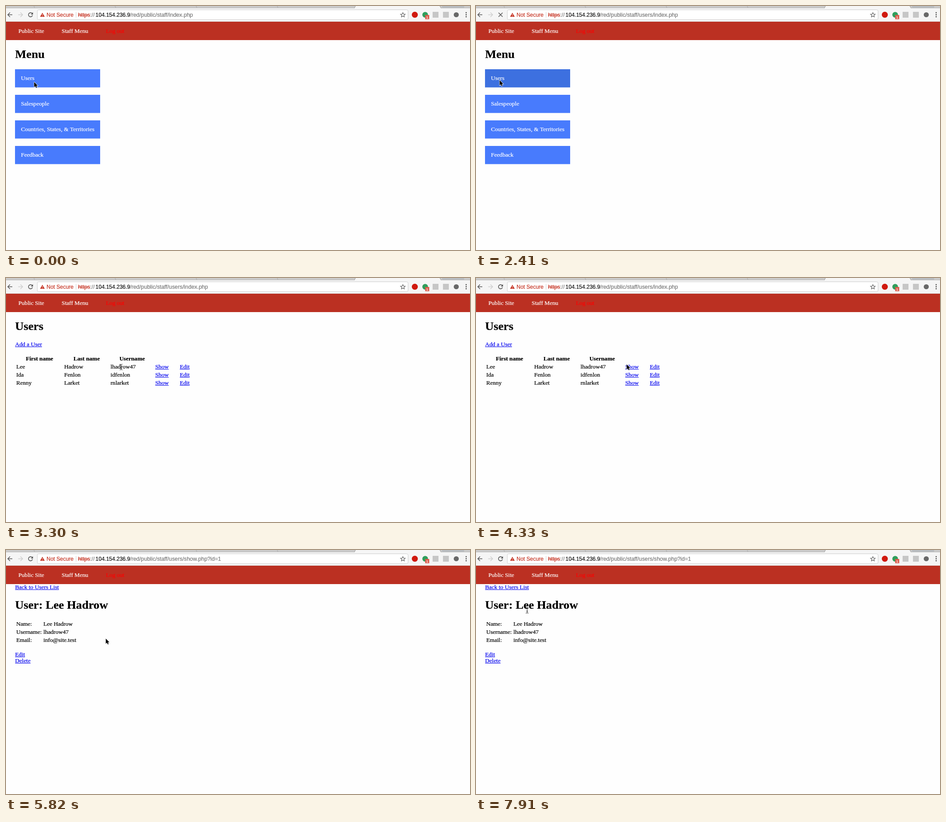
Recreate the animation shown at these times as an HTML page with a canvas. Size 1030 by 544 pixels, loop 8000 ms.

```html
<!DOCTYPE html>
<html lang="en">
<head>
<meta charset="utf-8">
<title>Staff area</title>
<style>
  html, body { margin: 0; width: 100%; height: 100%; overflow: hidden; background: #fefefe; }
  canvas { display: block; }
</style>
</head>
<body>
<canvas id="stage" width="1030" height="544"></canvas>
<script>
const ctx = document.getElementById('stage').getContext('2d');
const LOOP = 8000;
const PRESS = 780, RELEASE = 1070, MENU_LEFT = 1370, USERS_SHOWN = 2560;
const SHOW_CLICKED = 5070, USER_SHOWN = 5370;

const SERIF = '"Liberation Serif", "Times New Roman", serif';
const SANS = '"Liberation Sans", Arial, sans-serif';
const BODY = `13.1px ${SERIF}`;
const BOLD = `bold 13.1px ${SERIF}`;
const HEAD = `bold 26.2px ${SERIF}`;
const URL_FONT = `12.3px ${SANS}`;
const LINK = '#0000ee';
const LEFT = 20.3;
const CELL = 22.7;
const ROW = 18;

const MENU = ['Users', 'Salespeople', 'Countries, States, & Territories', 'Feedback'];
const PEOPLE = [
  ['Lee', 'Hadrow', 'lhadrow47'],
  ['Ida', 'Fenlon', 'idfenlon'],
  ['Renny', 'Larket', 'rnlarket']
];

// Each stroke starts where the one before it ends and follows a Bezier curve.
const START = { x: 62, y: 169 };
const STROKES = [
  stroke(150, 480, 3, at(63, 165), at(61, 159)),
  stroke(2270, 2560, 3, at(53, 163), at(52, 166)),
  stroke(2860, 3890, 8, at(235, 194), at(291, 204)),
  stroke(4030, 4480, 4, at(315, 166), at(337, 195)),
  stroke(4780, 5370, 5, at(343, 195)),
  stroke(5820, 6720, 7, at(200, 270), at(-20, 5), at(115, 140)),
  stroke(6870, 7910, 8, at(150, 190), at(110, 60), at(80, 130), at(113, 134))
];

function at(x, y) {
  return { x, y };
}

function stroke(from, to, steps, ...curve) {
  return { from, to, steps, curve };
}

function bezier(points, u) {
  if (points.length === 1) return points[0];
  const mixed = points.slice(1).map((p, i) => {
    const q = points[i];
    return at(q.x + (p.x - q.x) * u, q.y + (p.y - q.y) * u);
  });
  return bezier(mixed, u);
}

function pointerAt(t) {
  let spot = START;
  for (const { from, to, steps, curve } of STROKES) {
    if (t < from) break;
    const ticks = Math.floor((t - from) / (to - from) * (steps - 1) + 0.06);
    const p = Math.min(1, (ticks + 1) / steps);
    spot = bezier([spot, ...curve], 1 - (1 - p) ** 2);
  }
  return at(Math.round(spot.x), Math.round(spot.y));
}

function rect(x, y, w, h, color) {
  ctx.fillStyle = color;
  ctx.fillRect(x, y, w, h);
}

function disc(x, y, r, color) {
  ctx.fillStyle = color;
  ctx.beginPath();
  ctx.arc(x, y, r, 0, Math.PI * 2);
  ctx.fill();
}

function trace(points) {
  ctx.beginPath();
  points.forEach(([x, y]) => ctx.lineTo(x, y));
}

function shape(points, color) {
  trace(points);
  ctx.closePath();
  ctx.fillStyle = color;
  ctx.fill();
}

function line(points, color, width = 1) {
  trace(points);
  ctx.strokeStyle = color;
  ctx.lineWidth = width;
  ctx.stroke();
}

// A hairline outline gives the slightly heavier glyphs of desktop font smoothing.
function text(str, x, y, color = '#000', font = BODY, align = 'left') {
  ctx.font = font;
  ctx.textAlign = align;
  ctx.fillStyle = ctx.strokeStyle = color;
  ctx.lineWidth = 0.22;
  ctx.fillText(str, x, y);
  ctx.strokeText(str, x, y);
  return ctx.measureText(str).width;
}

function link(str, x, y) {
  rect(x, y + 1, text(str, x, y, LINK), 1, LINK);
}

function tabs() {
  rect(0, 0, 1030, 5, '#cbcbcb');
  for (let x = 63; x < 700; x += 180) line([[x - 1, 0], [x + 1, 5]], '#aaa');
  rect(0, 4, 1030, 1, '#b8b8b8');
  shape([[773, 5], [776, 0], [963, 0], [966, 5]], '#f6f6f6');
  line([[773, 5], [776, 0]], '#999');
  line([[963, 0], [966, 5]], '#999');
  rect(968, 0, 49, 4, '#b9bdc1');
}

function arrowIcon(x, y, dir, color) {
  const tip = x + 5 * dir;
  line([[x - 5 * dir, y], [tip, y]], color, 1.5);
  line([[x, y - 5], [tip, y], [x, y + 5]], color, 1.5);
}

function reloadIcon(x, y, loading) {
  const color = '#5a5a5a';
  if (loading) {
    for (const d of [-4.5, 4.5]) line([[x - d, y - 4.5], [x + d, y + 4.5]], color, 1.6);
    return;
  }
  ctx.beginPath();
  ctx.arc(x, y, 4.6, 0.3, Math.PI * 2 - 0.75);
  ctx.strokeStyle = color;
  ctx.lineWidth = 1.6;
  ctx.stroke();
  shape([[x + 5.5, y - 5.5], [x + 5.5, y - 0.5], [x + 0.5, y - 0.5]], color);
}

function star(cx, cy) {
  const points = Array.from({ length: 11 }, (_, i) => {
    const r = i % 2 ? 2.5 : 5.5;
    const a = i * Math.PI / 5 - Math.PI / 2;
    return [cx + r * Math.cos(a), cy + r * Math.sin(a)];
  });
  line(points, '#555', 1.1);
}

function addressBar(page) {
  const red = '#c63626', base = 24;
  ctx.beginPath();
  ctx.roundRect(69.5, 8.5, 823, 22, 3);
  ctx.fillStyle = '#fff';
  ctx.fill();
  ctx.strokeStyle = '#cdcdcd';
  ctx.lineWidth = 1;
  ctx.stroke();

  shape([[80.8, 15], [86, base], [75.6, base]], red);
  rect(80.3, 18, 1, 3, '#fff');
  rect(80.3, 22, 1, 1, '#fff');
  text('Not Secure', 90, base, red, `12px ${SANS}`);
  rect(155, 13, 1, 13, '#d4d4d4');
  const w = text('https', 160, base, red, URL_FONT);
  rect(160, 20, w, 1, red);
  text('://', 160 + w, base, '#808080', URL_FONT);
  text('104.154.236.9', 198.8, base, '#111', `12px ${SANS}`);
  text('/red/public/staff/' + page, 275, base, '#777', URL_FONT);
  star(881, 20);
}

function extensions(x, y) {
  const gap = 23;
  disc(x, y, 6.7, '#d0190f');
  disc(x + gap, y, 6.3, '#2f9e5b');
  rect(x + gap, y + 0.5, 9, 9.5, '#dc5a4b');
  text('1', x + gap + 4.5, y + 8.5, '#fff', `8px ${SANS}`, 'center');
  for (const i of [2, 3]) rect(x + gap * i - 6.5, y - 6.5, 13, 13, '#c6c6c6');
  disc(x + gap * 4, y, 5.6, '#686868');
  for (const d of [-4.5, 0, 4.5]) disc(x + gap * 5 - 1, y + d, 1.4, '#555');
}

function browser(page, loading) {
  tabs();
  rect(0, 5, 1030, 30, '#f5f5f5');
  rect(0, 34, 1030, 1, '#dcdcdc');
  arrowIcon(9, 19.5, -1, '#555');
  arrowIcon(32, 19.5, 1, '#cfcfcf');
  reloadIcon(54.5, 19.5, loading);
  addressBar(page);
  extensions(907.5, 19.5);
}

function nav() {
  rect(0, 35, 1030, 41, '#bb3022');
  let x = 27.5;
  for (const label of ['Public Site', 'Staff Menu', 'Log out']) {
    x += text(label, x, 60, label === 'Log out' ? '#f00' : '#fff') + 39;
  }
}

function menuPage(t) {
  const pressed = t >= PRESS && t < RELEASE;
  const hover = pressed ? '#3464c9' : '#3d70e0';
  text('Menu', LEFT, 116, '#000', HEAD);
  MENU.forEach((label, i) => {
    const y = 141 + 57 * i;
    rect(20, y, 189, 40.5, i === 0 && t >= 150 ? hover : '#487bfd');
    text(label, 33.2, y + 24, '#fff');
  });
}

function usersPage() {
  text('Users', LEFT, 116, '#000', HEAD);
  link('Add a User', LEFT, 152);
  const columns = [
    { title: 'First name', x: CELL, mid: 74.3 },
    { title: 'Last name', x: 129.2, mid: 179 },
    { title: 'Username', x: 232, mid: 280 }
  ];
  columns.forEach(({ title, x, mid }, c) => {
    text(title, mid, 184, '#000', BOLD, 'center');
    PEOPLE.forEach((cells, r) => text(cells[c], x, 202 + ROW * r));
  });
  PEOPLE.forEach((_, r) => {
    link('Show', 331.3, 202 + ROW * r);
    link('Edit', 385.8, 202 + ROW * r);
  });
}

function userPage() {
  const [first, last, login] = PEOPLE[0];
  const full = `${first} ${last}`;
  const rows = { 'Name:': full, 'Username:': login, 'Email:': 'info@site.test' };
  link('Back to Users List', LEFT, 87);
  text(`User: ${full}`, LEFT, 131, '#000', HEAD);
  Object.entries(rows).forEach(([label, value], i) => {
    text(label, CELL, 169 + ROW * i);
    text(value, 83, 169 + ROW * i);
  });
  link('Edit', LEFT, 237);
  link('Delete', LEFT, 251);
}

function beam(x, y) {
  const mid = x + 0.5;
  line([[mid, y - 5], [mid, y + 6]], '#222');
  line([[mid - 3, y - 6], [mid, y - 5], [mid + 3, y - 6]], '#222');
  line([[mid - 3, y + 7], [mid, y + 6], [mid + 3, y + 7]], '#222');
  line([[mid - 1.5, y + 2.5], [mid + 1.5, y + 2.5]], '#222');
}

function arrow(x, y) {
  ctx.save();
  ctx.translate(x + 0.5, y + 0.5);
  const outline = [[0, 0], [0, 11.4], [2.6, 9], [4.4, 13], [6.3, 12.2], [4.6, 8.2], [8, 8.2]];
  line([...outline, outline[0]], '#fff', 1.4);
  shape(outline, '#000');
  ctx.restore();
}

function pointer(t, screen) {
  const { x, y } = pointerAt(t);
  const overCells = screen === usersPage && x < 318 && y > 171 && y < 243;
  const overHead = screen === userPage && x < 226 && y > 107 && y < 138;
  (overCells || overHead ? beam : arrow)(x, y);
}

function draw(now) {
  const t = now % LOOP;
  const loading = (t >= RELEASE && t < USERS_SHOWN) || (t >= SHOW_CLICKED && t < USER_SHOWN);
  const page = t < MENU_LEFT ? 'index.php' : t < SHOW_CLICKED ? 'users/index.php' : 'users/show.php?id=1';
  const screen = t < USERS_SHOWN ? menuPage : t < USER_SHOWN ? usersPage : userPage;
  rect(0, 0, 1030, 544, '#fefefe');
  browser(page, loading);
  nav();
  screen(t);
  pointer(t, screen);
  requestAnimationFrame(draw);
}

requestAnimationFrame(draw);
</script>
</body>
</html>
```
